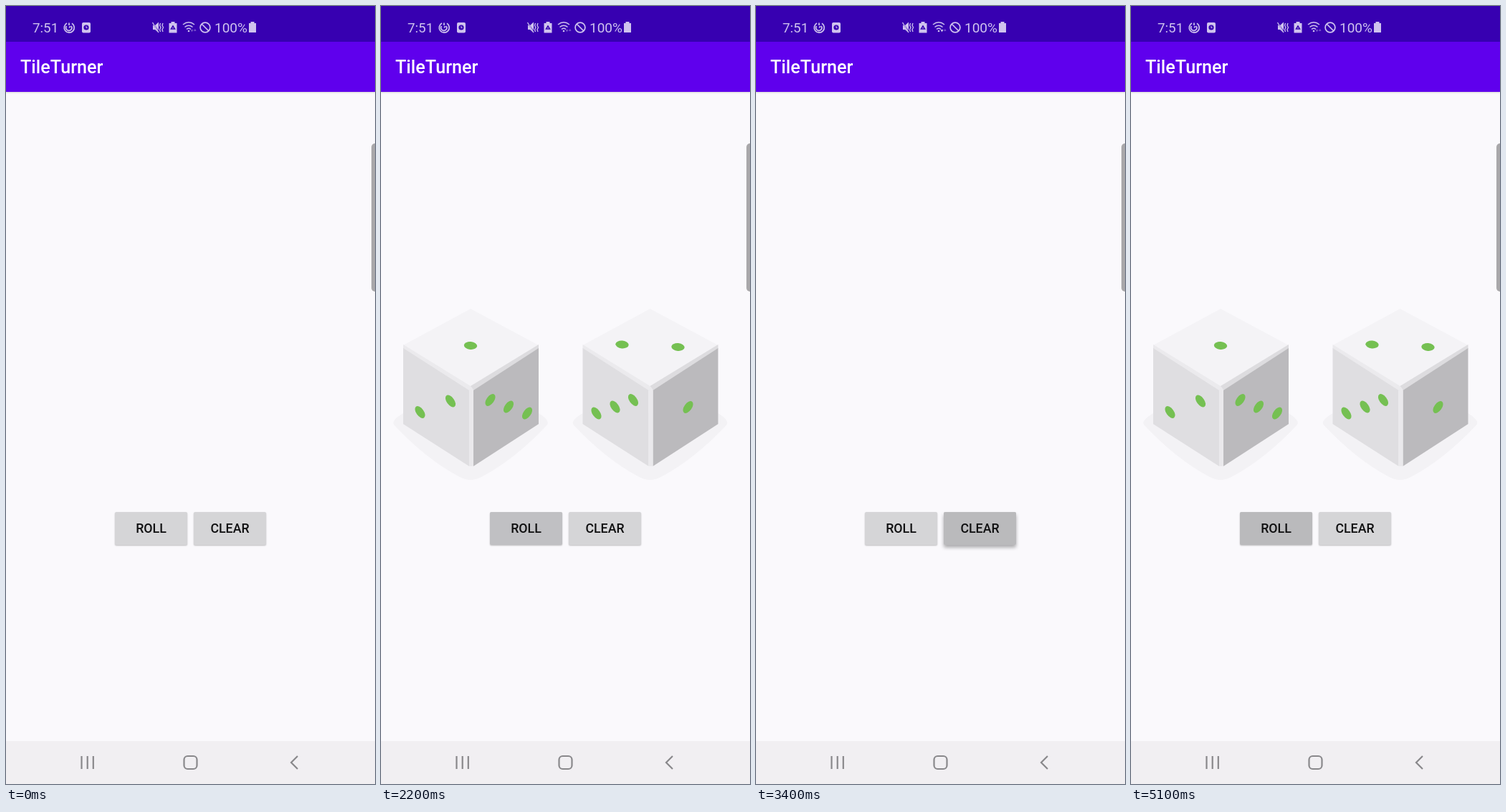
Recreate the animation shown at these times as an HTML page. Size 515 by 1087 pixels, loop 5200 ms.

```html
<!DOCTYPE html>
<html lang="en">
<head>
<meta charset="utf-8">
<title>TileTurner</title>
<style>
  html, body { margin: 0; width: 100%; height: 100%; overflow: hidden; background: #faf9fc; }
  body { position: relative; font-family: Roboto, sans-serif; }
  svg { position: absolute; left: 0; top: 0; display: block; }
  .bar { position: absolute; left: 0; width: 515px; }
  #status { top: 0; height: 50px; background: #3700b1; }
  #app { top: 50px; height: 70px; background: #5f00ed; box-shadow: 0 1px 2px rgba(0, 0, 0, .16); }
  #nav { top: 1027px; height: 60px; background: #f1eff2; }
  #edge { position: absolute; left: 510px; top: 192px; width: 10px; height: 207px; border-radius: 5px; background: #a9a8aa; }
  .btn {
    position: absolute; top: 707px; width: 101px; height: 46px; overflow: hidden;
    border-radius: 2px; background: #d5d5d7; color: #101011;
    font-size: 17.8px; font-weight: 500; line-height: 46px; text-align: center;
  }
  .btn i { position: absolute; left: 51px; top: 24px; border-radius: 50%; background: #bababc; transform: translate(-50%, -50%); }
  .btn span { position: relative; }
  #roll { left: 152px; }
  #clear { left: 262px; }
</style>
</head>
<body>
<div class="bar" id="app"></div>
<div class="bar" id="status"></div>
<div class="bar" id="nav"></div>

<svg width="515" height="1087" viewBox="0 0 515 1087">
  <defs>
    <g id="cube">
      <path d="M-94 569Q-111 579 -107 585Q-62 633 -17 657Q0 667 17 657Q62 633 107 585Q111 579 95 569Z" fill="#f3f2f5"/>
      <path d="M0 423L95 474L0 534L-94 474Z" fill="#f4f3f6"/>
      <path d="M-94 473L0 531L3 537L-2 538L-94 479Z" fill="#ebeaed"/>
      <path d="M95 473L0 531L4 538L95 479Z" fill="#dddcdf"/>
      <path d="M-94 478L-2 537V643L-94 584Z" fill="#dfdee1"/>
      <path d="M95 478L4 537V643L95 584Z" fill="#bbbabd"/>
      <path d="M-2 536L1 532L4 536V643H-2Z" fill="#eae9ec"/>
    </g>
  </defs>

  <text x="20" y="94" font-size="25.2" font-weight="500" fill="#fff">TileTurner</text>

  <g fill="#cfc3ee" stroke="none">
    <text x="37" y="37" font-size="18.8">7:51</text>
    <text x="291" y="37" font-size="19">100%</text>
    <path d="M341.500 22h5v2h2.500v13h-10v-13h2.500z"/>
    <rect x="106" y="23" width="12" height="14.500" rx="2"/>
    <path d="M205 27h3l5-4.500v15l-5-4.500h-3z"/>
    <path d="M230.500 22h5v2h3v13.500h-11v-13.500h3z"/>
  </g>
  <circle cx="112" cy="30" r="3.600" fill="#3700b1"/>
  <path d="M112 28v2.500h1.500" fill="none" stroke="#cfc3ee"/>
  <path d="M230.500 32l2.500-4 2.500 4zM204 23l10 14" fill="none" stroke="#3700b1" stroke-width="1.500"/>
  <g fill="none" stroke="#cfc3ee" stroke-width="1.700">
    <path d="M85 24A7 7 0 1 0 92 24.300M88 23.500V27M84.500 28A4 4 0 1 0 91 28M88 30l2-1.500"/>
    <path d="M204.500 23l8.500 14M215.500 24l-1 3 1.500 3-1.500 3 1 3M219 24l-1 3 1.500 3-1.500 3 1 3" stroke-width="1.300"/>
    <path d="M247 26Q255 19.500 263 26M249.500 29.500Q255 25 260.500 29.500M252 32.500Q255 30 258 32.500" stroke-width="1.500"/>
    <circle cx="278" cy="30" r="6.900"/>
    <path d="M273 25l10 10"/>
  </g>
  <circle cx="255" cy="35" r="1.300" fill="#cfc3ee"/>
  <path id="down" d="M257.500 33h4l-2 3.500z" fill="#cfc3ee"/>
  <path d="M262 35h3.500l-1.700-3.500z" fill="#cfc3ee" opacity=".4"/>

  <g fill="none" stroke="#89888b" stroke-width="2.200">
    <path d="M105.500 1048v18M113.700 1048v18M121.800 1048v18"/>
    <rect x="248.500" y="1048" width="18" height="18" rx="5"/>
    <path d="M407 1048l-9 9 9 9"/>
  </g>

  <g id="dice">
    <g transform="translate(125 0)"><use href="#cube"/><g class="pips"></g></g>
    <g transform="translate(375.500 0)"><use href="#cube"/><g class="pips"></g></g>
  </g>
</svg>

<div class="btn" id="roll"><i></i><span>ROLL</span></div>
<div class="btn" id="clear"><i></i><span>CLEAR</span></div>
<div id="edge"></div>

<script>
const LOOP = 5200, STEP = 100;
const $ = id => document.getElementById(id);
const clamp = x => Math.max(0, Math.min(1, x));

// Pip centres on the top face and on the left side; the right side mirrors the left.
const corners = [[0, 448], [-44, 474], [44, 475], [0, 501]];
const TOP = {
  1: [[0, 474.5]],
  2: [[-39, 473], [39, 476.5]],
  4: corners,
  5: [...corners, [0, 474.5]],
  6: [...corners, [-22, 461], [22, 488]]
};
const SIDE = {
  1: [[-49, 560.5]],
  2: [[-70.5, 567.5], [-28, 552]],
  3: [[-75, 569], [-49, 560], [-23.5, 550.5]]
};
// Left and right neighbours of each top value.
const NEAR = { 1: [2, 3], 2: [3, 1], 4: [2, 1], 5: [1, 3], 6: [3, 2] };

const PRESSES = [
  { btn: 'roll', down: 1100, up: 1200, dice: [2, 1] },
  { btn: 'roll', down: 1900, up: 2050, dice: [1, 2] },
  { btn: 'roll', down: 2800, up: 3000, dice: [1, 6] },
  { btn: 'clear', down: 3250, up: 3400, dice: null },
  { btn: 'roll', down: 4100, up: 4300, dice: [5, 4] },
  { btn: 'roll', down: 4800, up: 5000, dice: [1, 2] }
];

const pip = (x, y, rx, ry, turn) =>
  `<ellipse rx="${rx}" ry="${ry}" fill="#75c052" transform="translate(${x} ${y}) rotate(${turn})"/>`;

function pipsFor(value) {
  const [left, right] = NEAR[value];
  return TOP[value].map(([x, y]) => pip(x, y, 9.2, 5.4, 5)).join('')
    + SIDE[left].map(([x, y]) => pip(x, y, 5.3, 9.6, -36)).join('')
    + SIDE[right].map(([x, y]) => pip(4 - x, y, 5.3, 9.6, 36)).join('');
}

function drawButton(id, t) {
  const press = PRESSES.filter(p => p.btn === id && p.down <= t).pop();
  const btn = $(id), ripple = btn.firstElementChild;
  let size = 0, tint = 0, lift = 0;
  if (press) {
    size = Math.min(120, (t - press.down) * .88);
    tint = 1 - clamp((t - press.up - 100) / 200);
    lift = Math.min(clamp((t - press.down) / 100), 1 - clamp((t - press.up) / 100));
  }
  ripple.style.width = ripple.style.height = size + 'px';
  ripple.style.opacity = tint;
  btn.style.boxShadow = `0 ${1 + 2.5 * lift}px ${2 + 3 * lift}px rgba(0,0,0,${.24 + .08 * lift})`;
}

const pipGroups = document.querySelectorAll('.pips');
let shown;

function drawDice(t) {
  const last = PRESSES.filter(p => p.up <= t).pop();
  const dice = last ? last.dice : null;
  if (dice === shown) return;
  shown = dice;
  $('dice').style.display = dice ? '' : 'none';
  if (dice) pipGroups.forEach((g, i) => { g.innerHTML = pipsFor(dice[i]); });
}

function render(now) {
  const t = Math.floor((now - start) % LOOP / STEP) * STEP;
  drawDice(t);
  drawButton('roll', t);
  drawButton('clear', t);
  $('down').setAttribute('opacity', t >= 2900 && t < 4700 ? 1 : .4);
}

const start = performance.now();
function tick() {
  render(performance.now());
  requestAnimationFrame(tick);
}
tick();
</script>
</body>
</html>
```
